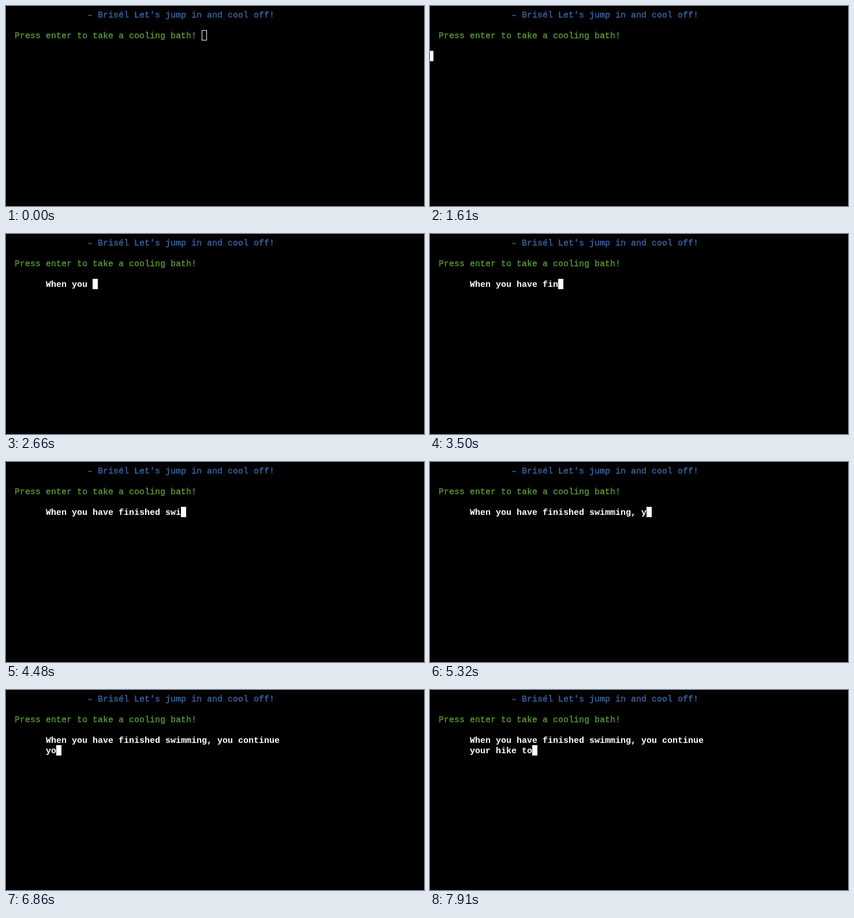
These frames come from a looping animation (724 px wide and 348 px high, 8000 ms). An HTML page with a canvas:

```html
<!DOCTYPE html>
<html lang="en">
<head>
<meta charset="utf-8">
<title>Terminal story</title>
<style>
  html, body { margin: 0; width: 100%; height: 100%; overflow: hidden; background: #000; }
  canvas { display: block; }
</style>
</head>
<body>
<canvas id="stage" width="724" height="348"></canvas>
<script>
const ctx = document.getElementById("stage").getContext("2d");
const LOOP = 8000;
const CELL = { w: 9, h: 18, left: -3, top: 6 };
const FAMILY = '"Liberation Mono", "Courier New", monospace';
const BLUE = "#3b68a8", GREEN = "#5a9c32", WHITE = "#fff";

const FILL_AT = 840;     // prompt cursor turns solid
const ENTER_AT = 1610;   // output starts
const TICK = 70;
// Screen refresh on which each of ten consecutive steps becomes visible
const STEP_TICKS = [0, 2, 4, 5, 7, 8, 10, 11, 12, 14];
const TICKS_PER_TEN = 15;

const INDENT = 8;
const STORY = ["When you have finished swimming, you continue", "your hike to"];

const colX = col => CELL.left + col * CELL.w;
const rowY = row => CELL.top + row * CELL.h;

function write(text, col, row, color, weight = "normal") {
  const x = colX(col), y = rowY(row) + 14;
  ctx.font = `${weight} 15px ${FAMILY}`;
  ctx.fillStyle = ctx.strokeStyle = color;
  ctx.fillText(text, x, y);
  if (weight === "normal") {
    ctx.lineWidth = 0.35;   // slightly heavier strokes
    ctx.strokeText(text, x, y);
  }
}

function cursor(col, row, solid = true) {
  const x = colX(col), y = rowY(row);
  ctx.fillStyle = ctx.strokeStyle = WHITE;
  ctx.lineWidth = 1;
  if (solid) ctx.fillRect(x, y, CELL.w, CELL.h);
  else ctx.strokeRect(x + 0.5, y + 0.5, CELL.w - 1, CELL.h - 1);
}

function stepAt(t) {
  const ticks = Math.floor((t - ENTER_AT) / TICK);
  if (ticks === 1) return 1;   // the first indent comes early
  const tens = Math.floor(ticks / TICKS_PER_TEN);
  const rest = ticks % TICKS_PER_TEN;
  return tens * 10 + STEP_TICKS.filter(n => n <= rest).length - 1;
}

// Per line: one step for the new line, one for the indent, then one per letter
function typeStory(step) {
  for (let i = 0; i < STORY.length; i++) {
    const line = STORY[i], row = 4 + i;
    const count = Math.max(0, Math.min(step - 1, line.length));
    write(line.slice(0, count), INDENT, row, WHITE, "bold");
    if (step <= line.length + 1 || i === STORY.length - 1) {
      cursor(step === 0 ? 0 : INDENT + count, row);
      return;
    }
    step -= line.length + 2;
  }
}

function draw(t) {
  ctx.fillStyle = "#000";
  ctx.fillRect(0, 0, 724, 348);
  write("– Brisél Let's jump in and cool off!", 16, 0, BLUE);
  write("Press enter to take a cooling bath!", 2, 2, GREEN);
  if (t < ENTER_AT) cursor(38, 2, t >= FILL_AT);
  else typeStory(stepAt(t));
}

const start = performance.now();
function frame() {
  draw((performance.now() - start) % LOOP);
  requestAnimationFrame(frame);
}
frame();
</script>
</body>
</html>
```
